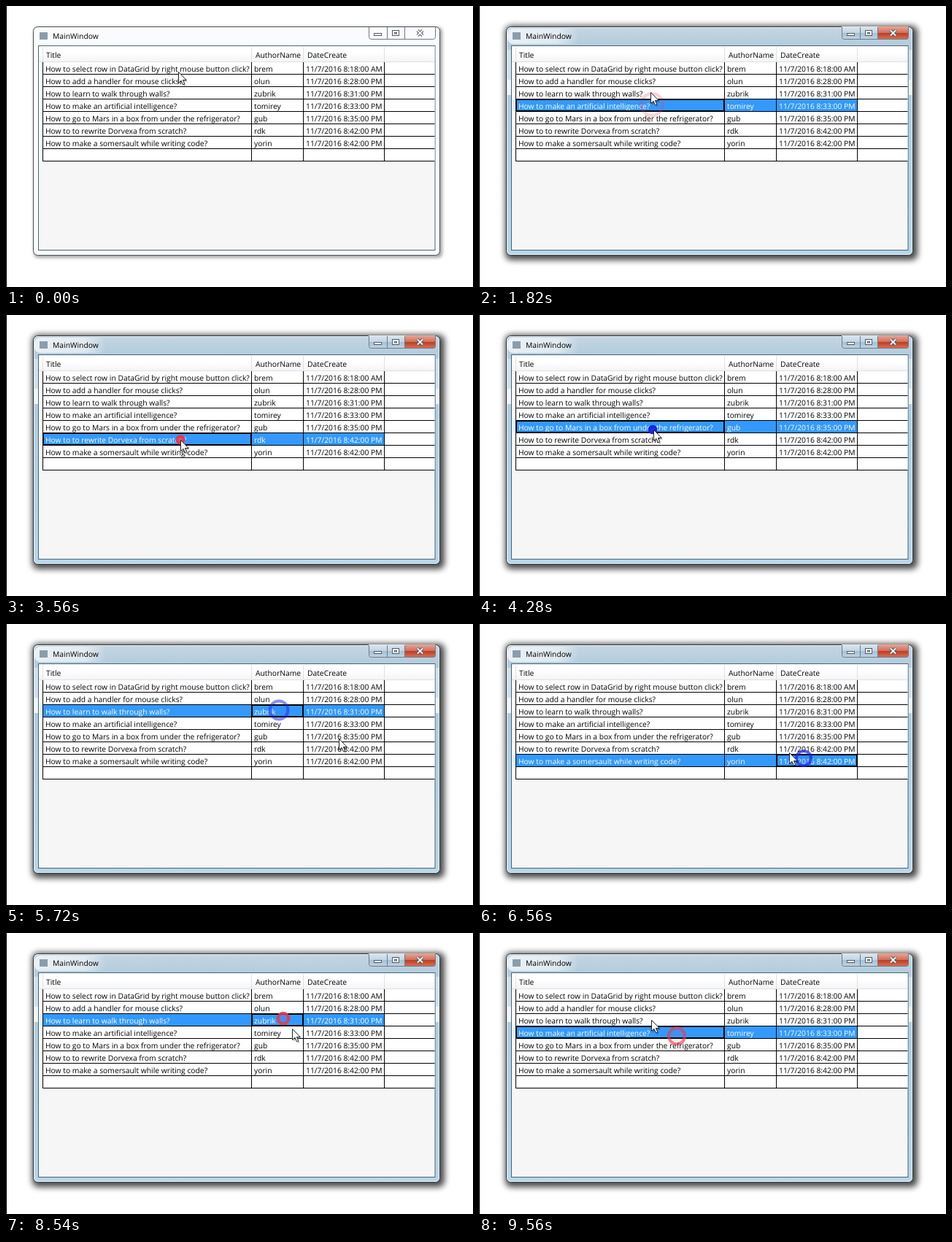
An HTML page that plays this animation: 640x385 px, repeating every 9.62 s.

```html
<!DOCTYPE html>
<html lang="en">
<head>
<meta charset="utf-8">
<title>Row selection</title>
<style>
  html, body { margin: 0; width: 100%; height: 100%; overflow: hidden; background: #fff; }
  svg { display: block; width: 640px; height: 385px; }
  text { font: 10.3px "Open Sans", "Noto Sans", sans-serif; fill: #000; text-rendering: geometricPrecision; }
  .selected text { fill: #fff; }
  .row .fill { visibility: hidden; }
  .row.selected .fill { visibility: visible; }
</style>
</head>
<body>
<svg viewBox="0 0 640 385">
  <defs>
    <linearGradient id="glass" x2="0" y2="1">
      <stop offset="0" stop-color="#c6d6e2"/>
      <stop offset=".07" stop-color="#b5cddd"/>
      <stop offset=".3" stop-color="#b0cde0"/>
      <stop offset="1" stop-color="#bad6e9"/>
    </linearGradient>
    <linearGradient id="glow">
      <stop offset="0" stop-color="#fff" stop-opacity=".7"/>
      <stop offset=".7" stop-color="#fff" stop-opacity=".55"/>
      <stop offset="1" stop-color="#fff" stop-opacity="0"/>
    </linearGradient>
    <linearGradient id="button" x2="0" y2="1">
      <stop offset="0" stop-color="#dbe7f0"/>
      <stop offset=".48" stop-color="#c3d5e3"/>
      <stop offset=".5" stop-color="#a5bfd2"/>
      <stop offset="1" stop-color="#c0d6e8"/>
    </linearGradient>
    <linearGradient id="close" x2="0" y2="1">
      <stop offset="0" stop-color="#e5a798"/>
      <stop offset=".48" stop-color="#d0705c"/>
      <stop offset=".5" stop-color="#bd3a22"/>
      <stop offset="1" stop-color="#d8765a"/>
    </linearGradient>
    <linearGradient id="head" x2="0" y2="1">
      <stop offset=".4" stop-color="#fff"/>
      <stop offset="1" stop-color="#f3f4f6"/>
    </linearGradient>
    <filter id="blur" x="-10%" y="-10%" width="120%" height="120%"><feGaussianBlur stdDeviation="4.500"/></filter>
    <filter id="soft" x="-10%" y="-10%" width="120%" height="120%"><feGaussianBlur stdDeviation="2"/></filter>
    <clipPath id="caption"><path d="M497 28H588.500V42.500Q588.500 46 585 46H500.500Q497 46 497 42.500Z"/></clipPath>
  </defs>
  <path d="M.5 0V385" stroke="#000"/>

  <g id="inactive">
    <rect x="38" y="29" width="560" height="316" rx="6" fill="#000" opacity=".35" filter="url(#soft)"/>
    <rect x="37.500" y="28.500" width="557" height="313" rx="6" fill="#fafbfc" stroke="#4c5054"/>
  </g>
  <g id="active">
    <rect x="36" y="27" width="565" height="321" rx="8" fill="#000" opacity=".72" filter="url(#blur)"/>
    <rect x="37.500" y="28.500" width="557" height="313" rx="6" fill="url(#glass)" stroke="#2f383f"/>
    <rect x="38.500" y="29.500" width="555" height="311" rx="5" fill="none" stroke="#fff" stroke-opacity=".65"/>
    <rect x="39" y="31" width="98" height="21" rx="8" fill="url(#glow)"/>
    <path d="M39 60H44V101H39ZM589 60H594V101H589Z" fill="#fff" opacity=".4"/>
    <path d="M39 101H44V122H39ZM589 101H594V122H589Z" fill="#fff" opacity=".8"/>
    <g clip-path="url(#caption)">
      <rect x="497" y="28" width="50" height="18" fill="url(#button)"/>
      <rect x="547" y="28" width="42" height="18" fill="url(#close)"/>
    </g>
  </g>

  <g fill="none" stroke="#6f7a86">
    <path d="M497.500 29V42.500Q497.500 45.500 500.500 45.500H585.500Q588.500 45.500 588.500 42.500V29M522.500 29V45M546.500 29V45"/>
    <rect x="504.500" y="37.500" width="10" height="3" fill="#fff" stroke="#535862"/>
    <rect x="529.500" y="33.500" width="9" height="7" fill="#fff" stroke="#535862"/>
    <rect x="532.500" y="36.500" width="3" height="1.500" stroke="#535862"/>
    <path d="M564 33.500L571 40.500M571 33.500L564 40.500" stroke="#535862" stroke-width="4"/>
    <path d="M564 33.500L571 40.500M571 33.500L564 40.500" stroke="#fff" stroke-width="1.800"/>
  </g>
  <rect x="46" y="36" width="11" height="10" fill="#8a9dad"/>
  <text x="64" y="45">MainWindow</text>

  <rect x="44.500" y="54.500" width="543.500" height="280" fill="#f6f6f6" stroke="#456574"/>
  <rect x="45" y="55" width="542.500" height="22" fill="url(#head)"/>
  <rect x="45" y="77" width="542.500" height="136" fill="#fff"/>
  <path d="M50.500 56V76M336.500 56V76M407.500 56V76M518.500 56V76M45 76.500H587" stroke="#dde0e4"/>
  <text x="55" y="71">Title</text>
  <text x="342" y="71">AuthorName</text>
  <text x="413" y="71">DateCreate</text>
  <g id="rows"></g>
  <path id="lines" fill="none" stroke="#000"/>
  <rect id="focus" fill="none" stroke="#000" stroke-width="2"/>
  <g id="ripples"></g>
  <g id="cursor">
    <path d="M2 2V18L5.600 14.600L8 20L10.400 19L8 13.800H13Z" fill="#000" opacity=".25"/>
    <path d="M.5 .5V15.500L4 12.300L6.400 17.800L8.800 16.800L6.400 11.500H11.300Z" fill="#fff" stroke="#222"/>
  </g>
</svg>
<script>
const LOOP = 9620, STEP = 60, FOCUS_AT = 1280, RIPPLE = 600;
const TOP = 77, ROW = 17, COLS = [50, 336, 407, 518];
const RED = "#e8384c", BLUE = "#1c24e0";

const data = [
  ["How to select row in DataGrid by right mouse button click?", "brem", "8:18:00 AM"],
  ["How to add a handler for mouse clicks?", "olun", "8:28:00 PM"],
  ["How to learn to walk through walls?", "zubrik", "8:31:00 PM"],
  ["How to make an artificial intelligence?", "tomirey", "8:33:00 PM"],
  ["How to go to Mars in a box from under the refrigerator?", "gub", "8:35:00 PM"],
  ["How to to rewrite Dorvexa from scratch?", "rdk", "8:42:00 PM"],
  ["How to make a somersault while writing code?", "yorin", "8:42:00 PM"]
];

// time, x, y, colour
const clicks = [
  [1280, 237, 135, RED], [2360, 234, 107, RED], [2840, 235, 139, RED],
  [3480, 239, 171, RED], [4230, 238, 157, BLUE], [5270, 374, 118, BLUE],
  [6200, 445, 184, BLUE], [7080, 334, 141, RED], [7620, 342, 102, RED],
  [8300, 380, 117, RED], [8840, 423, 168, RED], [9160, 271, 141, RED]
];

// time, x, y
const path = [
  [0, 236, 90], [400, 236, 90], [1080, 237, 137], [1400, 237, 137],
  [1820, 235, 118], [2240, 234, 106], [2420, 234, 106], [2780, 234, 140],
  [2960, 235, 140], [3420, 239, 171], [3660, 239, 171], [4160, 239, 157],
  [4400, 239, 157], [5180, 374, 118], [5360, 374, 118], [5720, 456, 157],
  [6140, 445, 184], [6380, 445, 184], [7040, 334, 140], [7160, 334, 140],
  [7520, 341, 104], [7580, 342, 102], [7760, 342, 102], [8240, 380, 117],
  [8400, 380, 117], [8800, 423, 167], [8900, 423, 167], [9140, 271, 141],
  [9260, 271, 141], [9560, 236, 119], [LOOP, 236, 119]
];

const $ = id => document.getElementById(id);

function set(node, attrs) {
  for (const key in attrs) node.setAttribute(key, attrs[key]);
}

function add(parent, tag, attrs, text = "") {
  const node = document.createElementNS("http://www.w3.org/2000/svg", tag);
  set(node, attrs);
  node.textContent = text;
  return parent.appendChild(node);
}

const rows = data.map(([title, author, time], i) => {
  const y = TOP + ROW * i, g = add($("rows"), "g", { class: "row" });
  add(g, "rect", { class: "fill", x: 46, y, width: 5, height: ROW - 1, fill: "#e6f4fc" });
  add(g, "rect", { class: "fill", x: 51, y, width: 467, height: ROW - 1, fill: "#3399ff" });
  [title, author, "11/7/2016 " + time].forEach((text, c) =>
    add(g, "text", { x: COLS[c] + 4, y: y + 13 }, text));
  return g;
});

let grid = COLS.map(x => `M${x + .5} ${TOP}V${TOP + ROW * 8 - 1}`).join("");
for (let i = 1; i <= 8; i++) grid += `M50 ${TOP + ROW * i - .5}H587.5`;
$("lines").setAttribute("d", grid);

const ripples = clicks.map(([, cx, cy, color]) =>
  add($("ripples"), "circle", { cx, cy, fill: color, stroke: color, "stroke-width": 4 }));

function cursorAt(t) {
  const i = path.findIndex(key => key[0] > t);
  const [t0, x0, y0] = path[i - 1], [t1, x1, y1] = path[i];
  const u = (t - t0) / (t1 - t0), e = u * u * (3 - 2 * u);
  return [x0 + (x1 - x0) * e, y0 + (y1 - y0) * e];
}

function draw(now) {
  const raw = now % LOOP;
  const t = raw < 20 ? 0 : Math.floor((raw - 20) / STEP) * STEP + 20;
  const focused = t >= FOCUS_AT;
  $("active").style.display = focused ? "" : "none";
  $("inactive").style.display = focused ? "none" : "";

  const last = clicks.filter(c => c[0] <= t).pop();
  const current = last ? Math.floor((last[2] - TOP) / ROW) : -1;
  rows.forEach((g, i) => g.classList.toggle("selected", i === current));
  $("focus").style.display = last ? "" : "none";
  if (last) {
    const c = last[1] < COLS[1] ? 0 : last[1] < COLS[2] ? 1 : 2;
    set($("focus"), { x: COLS[c] + 1, y: TOP + ROW * current, width: COLS[c + 1] - COLS[c] - 1, height: ROW - 1 });
  }

  ripples.forEach((circle, i) => {
    const p = (t - clicks[i][0]) / RIPPLE, on = p >= 0 && p < 1;
    circle.style.display = on ? "" : "none";
    if (!on) return;
    set(circle, {
      r: 4 + 13 * p ** 1.5,
      "fill-opacity": p < .33 ? Math.min(1, 1.15 - 3 * p) : .15,
      opacity: 1 - p ** 2.5
    });
  });

  const [x, y] = cursorAt(t);
  $("cursor").setAttribute("transform", `translate(${Math.round(x)} ${Math.round(y)})`);
}

const start = performance.now();
function tick() {
  draw(performance.now() - start);
  requestAnimationFrame(tick);
}
tick();
</script>
</body>
</html>
```
